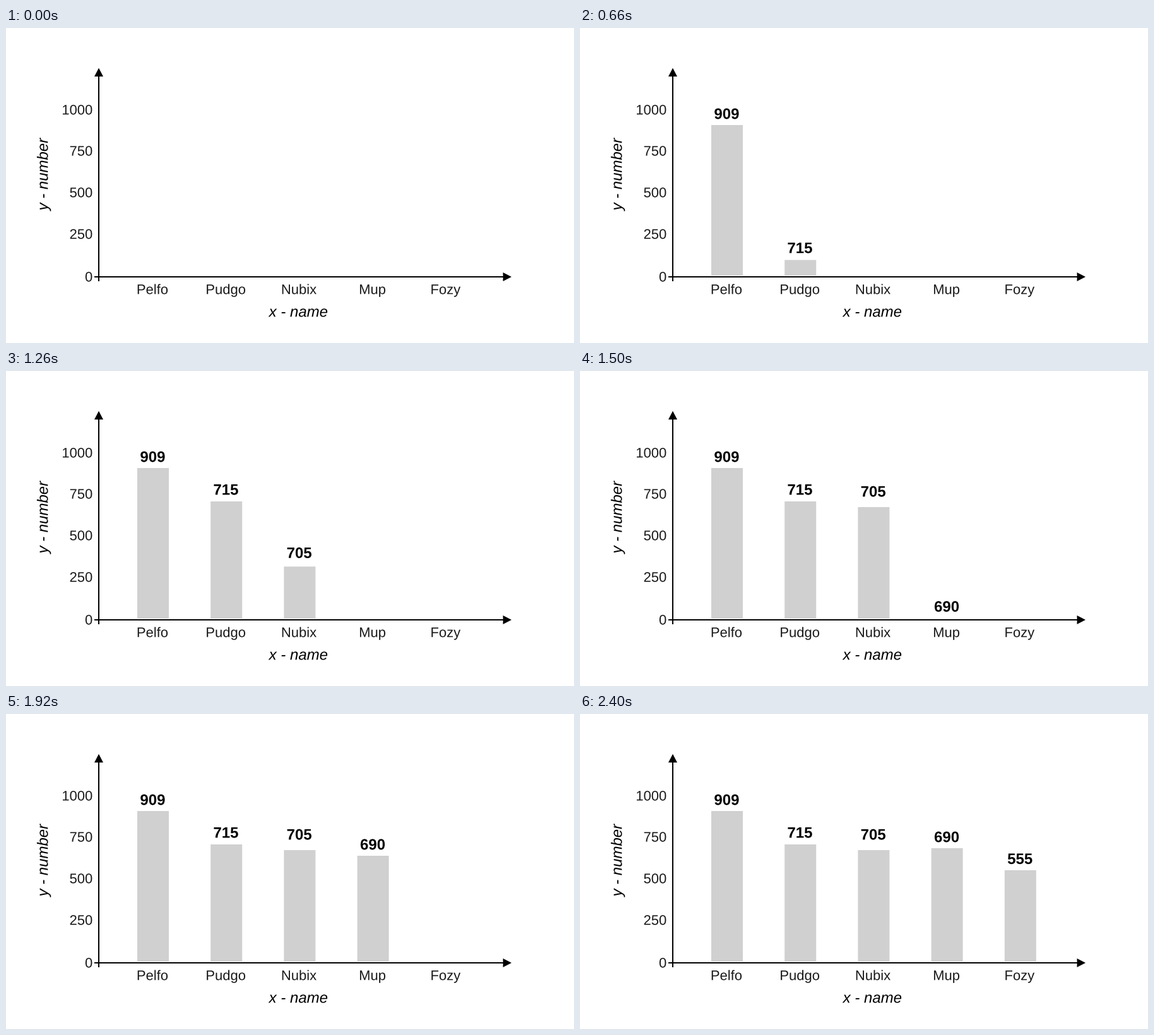
Write a matplotlib script that moves like this. It is 900x500 px and loops after 3.63 s.

```python
import numpy as np
import matplotlib.pyplot as plt
from matplotlib.animation import FuncAnimation
from matplotlib.patches import PathPatch, Polygon, Rectangle
from matplotlib.textpath import TextPath
from matplotlib.transforms import Affine2D

WIDTH, HEIGHT, DPI = 900, 500, 100
STEP_MS, FRAMES = 30, 121
START, GROW = 5, 15          # first growing frame, frames per bar
BASE, BAR_WIDTH, PITCH = 393, 50, 116.2
LABEL_START = 382            # baseline of a value label on an empty bar
INK = "#1a1a1a"

# name, value, final bar top, final label baseline
BARS = [
    ("Pelfo", "909", 154, 144.3),
    ("Pudgo", "715", 207, 196.4),
    ("Nubix", "705", 216, 199.4),
    ("Mup", "690", 213, 203.3),
    ("Fozy", "555", 248, 238.0),
]
TICKS = [("1000", 137.3), ("750", 202.6), ("500", 268.6),
         ("250", 334.6), ("0", 402.4)]

fig = plt.figure(figsize=(WIDTH / DPI, HEIGHT / DPI), dpi=DPI, facecolor="white")
ax = fig.add_axes([0, 0, 1, 1])
ax.set_xlim(0, WIDTH)
ax.set_ylim(HEIGHT, 0)
ax.axis("off")


def add_text(x, baseline, text, size, color="black", align=0.5, angle=0, **font):
    """Place text with the given share of its ink width left of x."""
    path = TextPath((0, 0), text, size=size,
                    prop={"family": "Liberation Sans", **font})
    box = path.get_extents()
    place = (Affine2D().translate(-box.x0 - align * box.width, 0)
             .scale(1, -1).rotate_deg(angle).translate(x, baseline))
    patch = PathPatch(place.transform_path(path), facecolor=color, linewidth=0)
    return ax.add_patch(patch)


def add_box(x, y, width, height, color="black"):
    return ax.add_patch(Rectangle((x, y), width, height, facecolor=color,
                                  linewidth=0, snap=False))


def draw_axes():
    add_box(146, 72, 2, 330)
    add_box(140, 394, 652, 2)
    for points in ([(147, 63.5), (140, 77), (154, 77)],
                   [(801, 395), (787.5, 388), (787.5, 402)]):
        ax.add_patch(Polygon(points, facecolor="black", linewidth=0))
    for text, baseline in TICKS:
        add_text(136.4, baseline, text, 22, INK, align=1)
    add_text(462.4, 458.3, "x - name", 24, style="italic")
    add_text(66.3, 232.5, "y - number", 24, angle=-90, style="italic")


draw_axes()
bars, labels = [], []
for i, (name, value, top, baseline) in enumerate(BARS):
    center = 232.4 + PITCH * i
    add_text(center, 422.3, name, 22, INK)
    bars.append(add_box(208 + PITCH * i, BASE, BAR_WIDTH, 0, "#d0d0d0"))
    labels.append(add_text(center, LABEL_START, value, 24, weight="bold"))


def update(frame):
    for i, (bar, label) in enumerate(zip(bars, labels)):
        _, _, top, baseline = BARS[i]
        elapsed = frame - START - i * GROW
        progress = np.clip(elapsed / GROW, 0, 1)
        bar.set_height(progress * (top - BASE))
        bar.set_visible(elapsed > 0)
        shift = progress * (baseline - LABEL_START)
        label.set_transform(Affine2D().translate(0, shift) + ax.transData)
        label.set_visible(elapsed >= 0)
    return bars + labels


anim = FuncAnimation(fig, update, frames=FRAMES, interval=STEP_MS,
                     repeat=True, repeat_delay=0)
plt.show()
```
